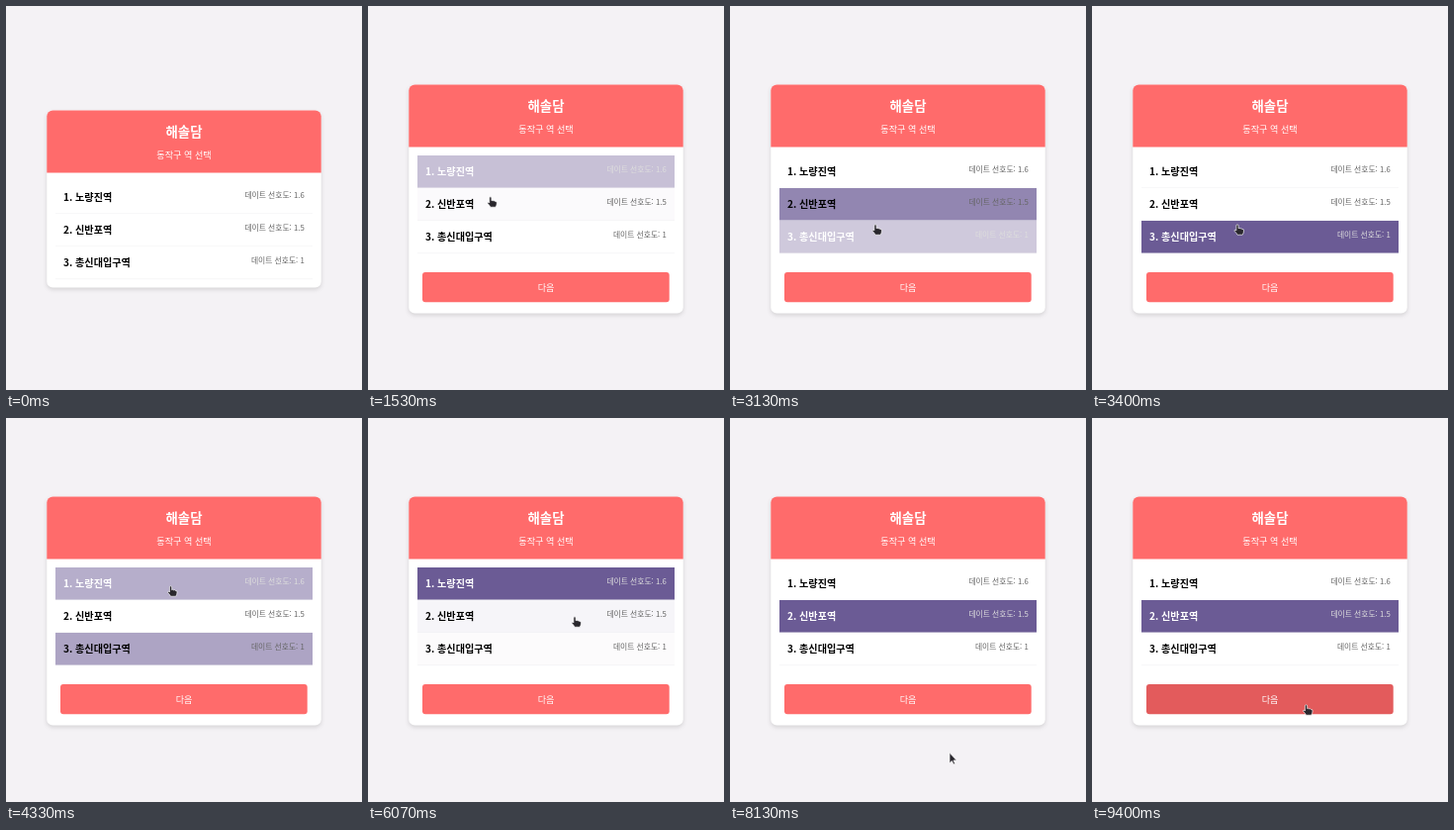
These frames come from a looping animation (360 px wide and 388 px high, 9540 ms). An HTML page:

```html
<!DOCTYPE html>
<html lang="ko">
<head>
<meta charset="utf-8">
<title>역 선택</title>
<style>
  html, body { margin: 0; width: 100%; height: 100%; overflow: hidden; background: #f4f2f5; }
  svg { display: block; width: 360px; height: 388px; font-family: "Noto Sans CJK KR", "Noto Sans CJK", sans-serif; }
  .card { filter: drop-shadow(0 2px 2px rgba(0, 0, 0, .13)); }
  .title { font-size: 13.4px; font-weight: 700; }
  .sub, .next { font-size: 9.1px; }
  .name { font-size: 10.1px; font-weight: 700; }
  .pref { font-size: 7.8px; text-anchor: end; }
  .mid { text-anchor: middle; fill: #fff; }
  .cursor path { fill: #29272d; stroke: #fff; stroke-width: .7; stroke-linejoin: round; }
</style>
</head>
<body>
<svg viewBox="0 0 360 388">
  <g id="panel">
    <rect id="card" class="card" x="41.3" y="79.4" width="277.4" rx="6" fill="#fff"/>
    <path d="M41.3 142.4V85.4a6 6 0 0 1 6-6H312.7a6 6 0 0 1 6 6V142.4Z" fill="#ff6b6b"/>
    <text class="title mid" x="180" y="106">해솔담</text>
    <text class="sub mid" x="180" y="127.7">동작구 역 선택</text>
    <g id="list"></g>
    <g id="button">
      <rect id="face" x="55" y="269" width="249.7" height="30.3" rx="3"/>
      <text class="next mid" x="180" y="288.4">다음</text>
    </g>
  </g>
  <g id="cursor" class="cursor">
    <path id="hand" transform="translate(1 0) scale(.93)" d="M-1.2 1A1.2 1.2 0 0 1 1.2 1V4Q2.3 3 3.2 4.2Q4.4 3.5 5.2 4.8Q7.2 4.4 7 6.5Q7 9 5.6 11H0Q-1 9-3 7Q-3.6 5.4-2 5.6L-1.2 6.5Z"/>
    <path id="arrow" d="M0 0V10.5L2.4 8.2L4 11.8L5.6 11L4 7.6H7.2Z"/>
  </g>
</svg>
<script>
  const LOOP = 9540, FADE = 300, ENTER = 140, TOP = 151, PITCH = 33, SHIFT = 26;
  const COLORS = {
    row: { none: [255, 255, 255], hover: [243, 241, 246], on: [107, 91, 149] },
    button: { none: [255, 107, 107], hover: [227, 91, 92] }
  };
  const CLICKS = [1470, 2320, 3080, 4250, 6720];
  const STATIONS = [['1. 노량진역', '1.6'], ['2. 신반포역', '1.5'], ['3. 총신대입구역', '1']];
  // Pointer stops: time, x, y
  const STOPS = [
    [ENTER, 322, 328], [1200, 123, 193], [2000, 122.5, 193], [2470, 126, 216], [2700, 135, 229],
    [3080, 146, 221], [3400, 146, 221], [4200, 165, 170], [5070, 174, 170], [5850, 208, 225],
    [6070, 208, 201], [6600, 203, 210], [6930, 203, 210], [7600, 222, 340], [8300, 222, 338],
    [8700, 216, 290], [LOOP, 215.5, 290]
  ];

  const $ = id => document.getElementById(id);
  const mix = (a, b, k) => a + (b - a) * k;
  const clamp = x => Math.min(1, Math.max(0, x));
  const smooth = x => x * x * (3 - 2 * x);
  const ease = x => 1 - (1 - x ** 1.3) ** 3;   // close to the CSS "ease" curve

  const isOpen = t => t > CLICKS[0];

  function pointer(t) {
    const i = Math.max(1, STOPS.findIndex(s => s[0] >= t));
    const [a, b] = [STOPS[i - 1], STOPS[i]];
    const k = smooth(clamp((t - a[0]) / (b[0] - a[0])));
    return [mix(a[1], b[1], k), mix(a[2], b[2], k)];
  }

  function rowUnder(t) {
    const [x, y] = pointer(t);
    const top = TOP + (isOpen(t) ? 0 : SHIFT);
    return x > 50 && x < 310 ? Math.floor((y - top) / PITCH) : -1;
  }

  // Each click picks the row under the pointer.
  const picked = t => CLICKS.reduce((row, c) => t > c ? rowUnder(c) : row, -1);

  const rowState = i => t => picked(t) === i ? 'on' : rowUnder(t) === i ? 'hover' : 'none';

  function buttonState(t) {
    const [x, y] = pointer(t);
    return isOpen(t) && x > 55 && x < 305 && y > 269 && y < 299 ? 'hover' : 'none';
  }

  // Lists the changes of a state over one loop; returns its faded colour at a time.
  function fader(state, colors) {
    const log = [[-FADE, state(0)]];
    for (let t = 0; t < LOOP; t += 10) {
      const now = state(t + 1);
      if (now !== log[log.length - 1][1]) log.push([t, now]);
    }
    const at = (t, i) => {
      const goal = colors[log[i][1]];
      if (i === 0) return goal;
      const from = at(log[i][0], i - 1), k = ease(clamp((t - log[i][0]) / FADE));
      return goal.map((c, n) => mix(from[n], c, k));
    };
    return t => `rgb(${at(t, log.filter(e => e[0] <= t).length - 1)})`;
  }

  const rows = STATIONS.map(([name, score], i) => {
    const y = TOP + i * PITCH;
    $('list').insertAdjacentHTML('beforeend', `<g>
      <rect x="50" y="${y + 32.3}" width="260" height=".8" fill="#ececef"/>
      <rect x="50" y="${y}" width="260" height="32.5"/>
      <text class="name" x="58" y="${y + 19.9}">${name}</text>
      <text class="pref" x="301.8" y="${y + 17.4}">데이트 선호도: ${score}</text></g>`);
    const [, back, title, pref] = $('list').lastElementChild.children;
    return { back, title, pref, color: fader(rowState(i), COLORS.row) };
  });
  const buttonColor = fader(buttonState, COLORS.button);

  function draw(t) {
    const open = isOpen(t), on = picked(t), under = rowUnder(t);
    $('panel').setAttribute('transform', `translate(0 ${open ? 0 : SHIFT})`);
    $('card').setAttribute('height', open ? 231 : 179);
    $('button').style.opacity = +open;
    $('face').style.fill = buttonColor(t);
    rows.forEach(({ back, title, pref, color }, i) => {
      back.style.fill = color(t);
      title.style.fill = i === on ? '#fff' : '#000';
      pref.style.fill = i === on ? '#ddd' : '#666';
    });
    const hand = (under >= 0 && under < rows.length) || buttonState(t) === 'hover';
    $('cursor').setAttribute('transform', `translate(${pointer(t)})`);
    $('cursor').style.opacity = +(t > ENTER);
    $('hand').style.opacity = +hand;
    $('arrow').style.opacity = +!hand;
  }

  let start;
  function tick(now) {
    start ??= now;
    draw((now - start) % LOOP);
    requestAnimationFrame(tick);
  }
  draw(0);
  requestAnimationFrame(tick);
</script>
</body>
</html>
```
